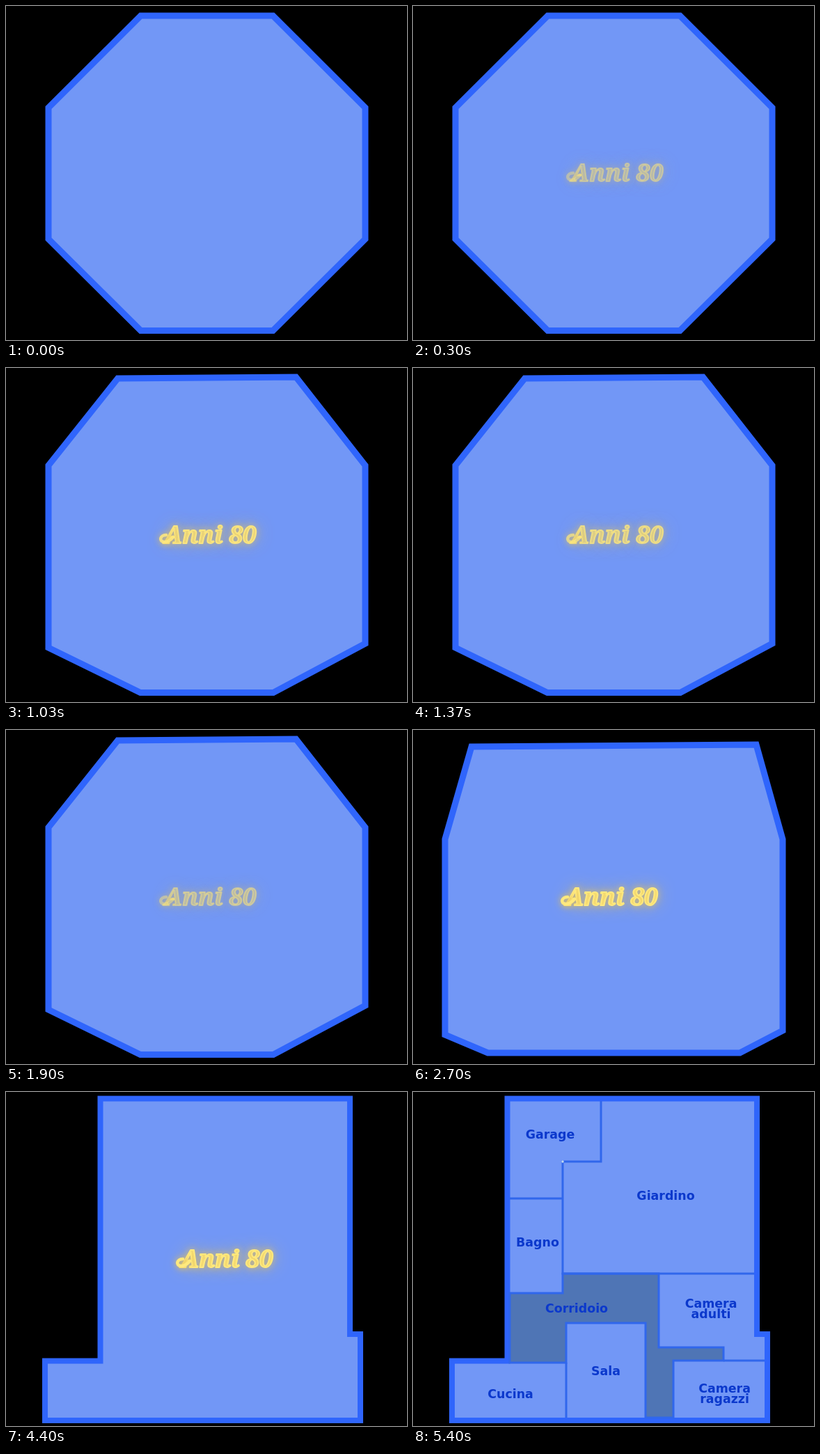
Write an HTML page with a canvas that moves like this. It is 576 by 480 pixels and loops after 5.96 s.

```html
<!DOCTYPE html>
<html lang="it">
<head>
<meta charset="utf-8">
<title>Anni 80</title>
<style>
  html, body { margin: 0; width: 100%; height: 100%; overflow: hidden; background: #000; }
  canvas { display: block; width: 576px; height: 480px; }
</style>
</head>
<body>
<canvas id="stage" width="576" height="480"></canvas>
<script>
const LOOP = 5960;
const SLIDE = 1000;
const FILL = '#7297f6';
const WALL = '#2f65fc';
const ctx = document.getElementById('stage').getContext('2d');

// Mirrors [half width, y, lean] points, top to bottom, around a vertical axis.
function mirrored(axis, points) {
  const right = points.map(([w, y, lean = 0]) => [axis + w, y - lean]);
  const left = points.map(([w, y, lean = 0]) => [axis - w, y + lean]).reverse();
  const path = new Path2D();
  [...right, ...left].forEach(([x, y]) => path.lineTo(x, y));
  path.closePath();
  return path;
}

const plan = new Path2D('M135.5 9.5H494V348H509V472H56V386.5H135.5Z');
const corridor = new Path2D('M215 261H353V367H446V386H374V468H334V332H220V389H139V289H215Z');
const partitions = new Path2D('M270 13V100H215V261H490M139 153H215M446 386H505M220 389V468');

// One outline per second; title is the centre of the neon text.
const slides = [
  { title: 290, wall: 9, shape: mirrored(288.5, [[95, 14], [227.5, 146], [227.5, 335], [95, 466.5]]) },
  { title: 290, wall: 9, shape: mirrored(288.5, [[128, 14, 1], [227.5, 140], [227.5, 399, 3], [95.5, 466.5]]) },
  { title: 282, wall: 9, shape: mirrored(288.5, [[204.5, 22.5, 1.5], [242.5, 157], [242.5, 435, 3], [181, 464]]) },
  { title: 282, wall: 9, shape: mirrored(286.5, [[217, 27.5, 1], [215.5, 351, 0.5], [258, 351, 0.5], [258, 461.5]]) },
  { title: 314, wall: 8, shape: plan },
  { rooms: true, wall: 8, shape: plan }
];

// Each label hangs from the baseline of its first line.
const labels = [
  ['Garage', 197, 67], ['Giardino', 363, 155], ['Bagno', 179, 222], ['Corridoio', 235, 317],
  ['Camera adulti', 428, 310], ['Sala', 277, 407], ['Cucina', 140, 440], ['Camera ragazzi', 447.5, 432]
];

const ramp = (t, from, to) => Math.min(1, Math.max(0, (t - from) / (to - from)));

// The neon lights up, dims, then comes back to full.
const opacity = t => ramp(t, 0, 750) - 0.6 * ramp(t, 750, 2000) + 0.6 * ramp(t, 2000, 2670);

function drawOutline({ shape, wall }) {
  ctx.fillStyle = FILL;
  ctx.fill(shape);
  ctx.strokeStyle = WALL;
  ctx.lineWidth = wall;
  ctx.stroke(shape);
}

function drawTitle(x, alpha) {
  const end = x + 69;
  ctx.save();
  ctx.globalAlpha = alpha;
  ctx.font = 'italic bold 34.5px "Noto Serif", serif';
  ctx.textAlign = 'right';
  ctx.fillStyle = ctx.strokeStyle = '#ffe97e';
  ctx.lineCap = ctx.lineJoin = 'round';
  ctx.shadowColor = '#e3c25c';
  ctx.shadowBlur = 24;
  ctx.fillText('Anni 80', end, 252);
  ctx.shadowBlur = 10;
  ctx.lineWidth = 2;
  ctx.strokeText('Anni 80', end, 252);
  // Swash on the capital.
  ctx.lineWidth = 4.5;
  ctx.beginPath();
  ctx.moveTo(x - 60, 240);
  ctx.bezierCurveTo(x - 69, 240, x - 71, 250, x - 62, 250);
  ctx.quadraticCurveTo(x - 56, 250, x - 50, 243);
  ctx.stroke();
  ctx.restore();
}

function drawLabel([text, x, y]) {
  text.split(' ').forEach((word, line) => ctx.fillText(word, x, y + 15 * line));
}

function drawRooms() {
  ctx.fillStyle = '#4f75b5';
  ctx.fill(corridor);
  ctx.strokeStyle = '#3067ec';
  ctx.lineWidth = 3;
  ctx.stroke(corridor);
  ctx.stroke(partitions);

  ctx.fillStyle = '#c4dcf0';
  ctx.beginPath();
  ctx.arc(215, 100, 1.7, 0, Math.PI * 2);
  ctx.fill();

  ctx.fillStyle = '#0b38cc';
  ctx.font = 'bold 17.4px "DejaVu Sans", sans-serif';
  ctx.textAlign = 'center';
  labels.forEach(drawLabel);
}

function draw(t) {
  const slide = slides[Math.floor(t / SLIDE)];
  ctx.fillStyle = '#000';
  ctx.fillRect(0, 0, 576, 480);
  drawOutline(slide);
  if (slide.rooms) drawRooms();
  else drawTitle(slide.title, opacity(t));
}

const start = performance.now();
function tick() {
  draw((performance.now() - start) % LOOP);
  requestAnimationFrame(tick);
}
tick();
</script>
</body>
</html>
```
